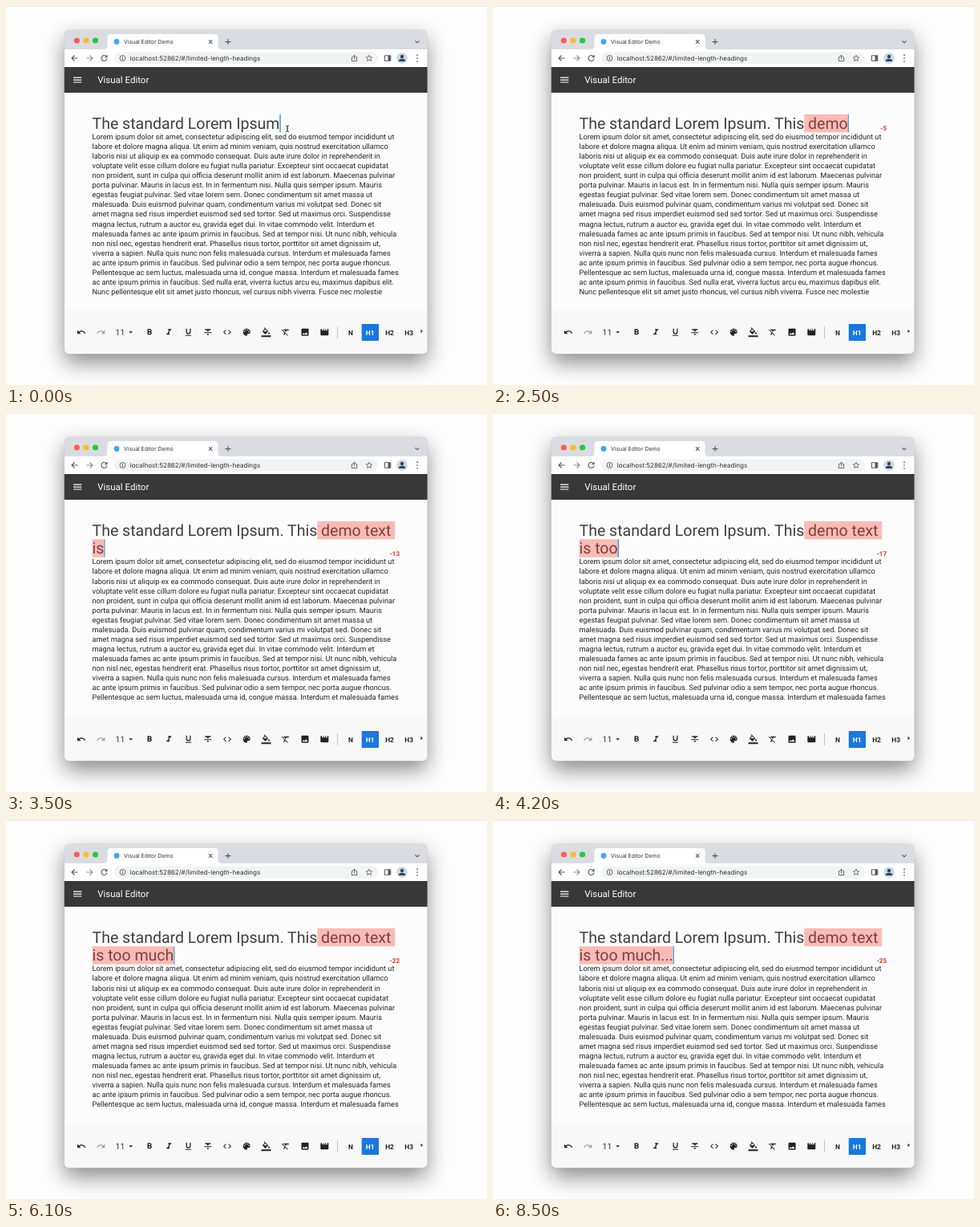
These frames come from a looping animation (600x472 px, 8.6 s). An HTML page:

```html
<!DOCTYPE html>
<html lang="en">
<head>
<meta charset="utf-8">
<title>Visual Editor Demo</title>
<style>
  html, body { margin: 0; width: 100%; height: 100%; overflow: hidden; background: #fdfdfd; }
  body { position: relative; }
  .shadow {
    position: absolute; left: 73px; top: 30px; width: 452px; height: 403px; border-radius: 6px;
    box-shadow: 0 0 1px rgba(0,0,0,.45), 0 11px 27px rgba(0,0,0,.46);
  }
  svg { position: absolute; left: 0; top: 0; display: block; }
  text { font-family: Roboto, sans-serif; white-space: pre; text-rendering: geometricPrecision; }
  .ui { font-family: Inter, sans-serif; fill: #303235; }
  .line { fill: none; stroke: #55585c; stroke-width: 1.1; }
  .heading { font-size: 19.53px; fill: #3f3f3f; }
  .body { font-size: 9.19px; fill: #222; }
  .count { font-size: 8px; font-weight: 700; fill: #d9362c; text-anchor: end; }
  .style { font-size: 8.4px; font-weight: 700; fill: #222; text-anchor: middle; }
  .over { fill: rgba(244,67,54,.35); }
</style>
</head>
<body>
<div class="shadow"></div>
<svg width="600" height="472" viewBox="0 0 600 472">
  <defs>
    <clipPath id="frame"><rect x="72.800" y="30" width="452.700" height="403.300" rx="6"/></clipPath>
    <clipPath id="page"><rect x="73" y="108" width="452" height="253.5"/></clipPath>
  </defs>
  <rect width="600" height="1" fill="#ebebeb"/>

  <g clip-path="url(#frame)">
    <rect x="72" y="30" width="454" height="25" fill="#dadce2"/>
    <rect x="72" y="54" width="454" height="22" fill="#fff"/>
    <rect x="72" y="76" width="454" height="32" fill="#383838"/>
    <rect x="72" y="108" width="454" height="270" fill="#fcfcfc"/>
    <rect x="72" y="378" width="454" height="56" fill="#f8f8f8"/>
  </g>

  <!-- browser tab strip -->
  <circle cx="88.3" cy="43" r="3.6" fill="#fe5f57"/>
  <circle cx="100" cy="43" r="3.6" fill="#febc2e"/>
  <circle cx="111.5" cy="43" r="3.6" fill="#28c840"/>
  <path d="M122 54q4.500 0 4.500-4.500V39.500q0-4.500 4.500-4.500H260q4.500 0 4.500 4.500V49.500q0 4.500 4.500 4.500z" fill="#fff"/>
  <circle cx="138" cy="44.500" r="3.400" fill="#42a5f5"/>
  <text class="ui" x="147" y="47.200" font-size="6.900">Visual Editor Demo</text>
  <path class="line" d="M253 42.400l4.400 4.400m0-4.400l-4.400 4.400M277 41.200v6.800m-3.400-3.400h6.800M510.500 43.300l2.500 2.500 2.500-2.500"/>

  <!-- address bar -->
  <rect x="135" y="57.500" width="329" height="15" rx="7.500" fill="#f1f3f4"/>
  <text class="ui" x="154.700" y="68" font-size="8.030">localhost:52862/#/limited-length-headings</text>
  <path class="line" d="M89.500 65h-7.500m3.500-3.500L82 65l3.500 3.500"/>
  <path class="line" style="stroke:#8d9094" d="M100.500 65h7.500m-3.500-3.500l3.500 3.500-3.500 3.500"/>
  <path class="line" d="M125.600 63.300a3.500 3.500 0 1 0 .4 2.200M126 61v2.800h-2.800"/>
  <g class="line">
    <circle cx="145.500" cy="65" r="3.500" stroke-width=".9"/>
    <path d="M145.500 64.500v2.500m0-4v.9"/>
    <path stroke-width=".9" d="M433 63.800h-1.700v4.800h6.400v-4.800H436M434.500 66.500v-5.300m-1.800 1.800l1.800-1.800 1.800 1.800"/>
    <path id="star" stroke-width=".8"/>
    <rect x="472.300" y="61.700" width="7.400" height="6.600" rx=".5"/>
  </g>
  <rect x="476.500" y="62" width="3" height="6" fill="#55585c"/>
  <circle cx="494" cy="65" r="6.800" fill="#c9d8e4"/>
  <path d="M489.800 69q0-3.200 4.200-3.200t4.200 3.200z" fill="#34465c"/>
  <circle cx="494" cy="63" r="2.200" fill="#34465c"/>
  <path d="M513 61.200v.01M513 65v.01M513 68.800v.01" stroke="#55585c" stroke-width="1.700" stroke-linecap="round"/>

  <!-- app bar -->
  <path d="M84 89.200h10.300M84 92.100h10.300M84 95h10.300" stroke="#fff" stroke-width="1.200"/>
  <text x="114.200" y="96.200" font-size="11.500" fill="#fff">Visual Editor</text>

  <!-- document -->
  <g clip-path="url(#page)">
    <text class="heading" id="line1" x="107.500" y="152.500"></text>
    <text class="heading" id="line2" x="107.500" y="174.900"></text>
    <g id="paragraph"></g>
    <rect class="over" id="over1" y="134.900" height="22.400"/>
    <rect class="over" id="over2" x="107.500" y="157.300" height="22.400"/>
    <text class="count" id="count" x="491"></text>
    <rect id="caret" width="1.200" height="22.400" fill="#1787d8"/>
  </g>
  <path id="mouse" d="M349 148.800q2 0 2 1.200v5.500q0 1.200-2 1.200M353 148.800q-2 0-2 1.200v5.500q0 1.200 2 1.200" fill="none" stroke="#222" stroke-width=".8"/>

  <!-- editor toolbar -->
  <g id="icons" fill="#222" fill-rule="evenodd"></g>
  <text x="136.600" y="410" font-size="10.300" fill="#333">11</text>
  <path d="M153.200 405.200h5l-2.500 2.600z" fill="#333"/>
  <path d="M413.500 399v15" stroke="#c4c4c4"/>
  <rect x="443.700" y="396" width="21.300" height="21" rx="1" fill="#1a78dc"/>
  <text class="style" x="430" y="409.500">N</text>
  <text class="style" x="454.200" y="409.500" style="fill:#fff">H1</text>
  <text class="style" x="478.500" y="409.500">H2</text>
  <text class="style" x="502.700" y="409.500">H3</text>
  <path d="M517.500 402.700l2.400 2.300-2.400 2.300z" fill="#222"/>
</svg>

<script>
const LOOP = 8600, LEFT = 107.5, MAX_WIDTH = 383.5, LINE = 12.06, HEADING_LINE = 22.4;
const BASE = 'The standard Lorem Ipsum';
const LIMIT = 'The standard Lorem Ipsum. This'.length;

// Typing bursts: start time, text, ms per key
const BURSTS = [
  [1000, '. This', 50], [2000, ' demo', 110], [2900, ' text', 90], [3350, ' is', 70],
  [3800, ' too', 110], [4400, ' much', 110], [6200, '...', 100]
];

const PARAGRAPH = `Lorem ipsum dolor sit amet, consectetur adipiscing elit, sed do eiusmod tempor incididunt ut
labore et dolore magna aliqua. Ut enim ad minim veniam, quis nostrud exercitation ullamco
laboris nisi ut aliquip ex ea commodo consequat. Duis aute irure dolor in reprehenderit in
voluptate velit esse cillum dolore eu fugiat nulla pariatur. Excepteur sint occaecat cupidatat
non proident, sunt in culpa qui officia deserunt mollit anim id est laborum. Maecenas pulvinar
porta pulvinar. Mauris in lacus est. In in fermentum nisi. Nulla quis semper ipsum. Mauris
egestas feugiat pulvinar. Sed vitae lorem sem. Donec condimentum sit amet massa ut
malesuada. Duis euismod pulvinar quam, condimentum varius mi volutpat sed. Donec sit
amet magna sed risus imperdiet euismod sed sed tortor. Sed ut maximus orci. Suspendisse
magna lectus, rutrum a auctor eu, gravida eget dui. In vitae commodo velit. Interdum et
malesuada fames ac ante ipsum primis in faucibus. Sed at tempor nisi. Ut nunc nibh, vehicula
non nisl nec, egestas hendrerit erat. Phasellus risus tortor, porttitor sit amet dignissim ut,
viverra a sapien. Nulla quis nunc non felis malesuada cursus. Interdum et malesuada fames
ac ante ipsum primis in faucibus. Sed pulvinar odio a sem tempor, nec porta augue rhoncus.
Pellentesque ac sem luctus, malesuada urna id, congue massa. Interdum et malesuada fames
ac ante ipsum primis in faucibus. Sed nulla erat, viverra luctus arcu eu, maximus dapibus elit.
Nunc pellentesque elit sit amet justo rhoncus, vel cursus nibh viverra. Fusce nec molestie`;

const hole = (x, y) => `M${x - 1.5} ${y}a1.5 1.5 0 1 0 3 0a1.5 1.5 0 1 0-3 0z`;

// Centre x and outline on a 24-unit grid
const ICONS = [
  [94, 'M12.5 8c-2.65 0-5.05 1-6.9 2.6L2 7v9h9l-3.6-3.6c1.4-1.2 3.1-1.9 5.1-1.9 3.5 0 6.5 2.3 7.6 5.5l2.4-.8C21 11 17 8 12.5 8z'],
  [118.3, 'M18.4 10.6C16.5 9 14.1 8 11.5 8c-4.6 0-8.6 3-10 7.2l2.4.8c1-3.2 4-5.5 7.6-5.5 2 0 3.7.7 5.1 1.9L13 16h9V7z', '#a2a2a2'],
  [179, 'M15.6 10.8c1-.7 1.65-1.8 1.65-2.8 0-2.3-1.75-4-4-4H7v14h7c2.1 0 3.75-1.7 3.75-3.8 0-1.5-.9-2.8-2.15-3.4zM10 6.5h3a1.5 1.5 0 0 1 0 3h-3zM13.5 15.5H10v-3h3.5a1.5 1.5 0 0 1 0 3z'],
  [203.2, 'M10 4v3h2.2l-3.4 8H6v3h8v-3h-2.2l3.4-8H18V4z'],
  [227.5, 'M12 17a6 6 0 0 0 6-6V3h-2.5v8a3.5 3.5 0 0 1-7 0V3H6v8a6 6 0 0 0 6 6zM5 19v2h14v-2z'],
  [251.8, 'M10 19h4v-3h-4zM5 4v3h5v3h4V7h5V4zM3 14h18v-2H3z'],
  [276, 'M9.4 16.6L4.8 12l4.6-4.6L8 6l-6 6 6 6zM14.6 16.6l4.6-4.6-4.6-4.6L16 6l6 6-6 6z'],
  [300.2, 'M12 3a9 9 0 1 0 0 18c1.4 0 2-1.4 1.1-2.5-.9-1 0-2.5 1.1-2.5H16a5 5 0 0 0 5-5c0-4.4-4-8-9-8z'
    + hole(6.5, 10.5) + hole(9.5, 6.5) + hole(14.5, 6.5) + hole(17.5, 10.5)],
  [324.5, 'M16.6 9L7.6 0 6.2 1.4l2.4 2.4L3.4 9a1.5 1.5 0 0 0 0 2l5.5 5.5a1.5 1.5 0 0 0 2.1 0l5.6-5.5a1.5 1.5 0 0 0 0-2zM5.2 10L10 5.2 14.8 10zM19 11.5s-2 2.2-2 3.5a2 2 0 0 0 4 0c0-1.3-2-3.5-2-3.5zM0 20h24v4H0z'],
  [348.7, 'M3.3 5L2 6.3l7 7L6.5 19h3l1.6-3.7 5.6 5.7 1.3-1.3zM6 5v.2L8.8 8h2.4l-.7 1.7 2.1 2.1L14.2 8H20V5z'],
  [373, 'M21 19V5a2 2 0 0 0-2-2H5a2 2 0 0 0-2 2v14a2 2 0 0 0 2 2h14a2 2 0 0 0 2-2zM8.5 13.5l2.5 3 3.5-4.5 4.5 6H5z'],
  [397.3, 'M18 4l2 4h-3l-2-4h-2l2 4h-3l-2-4H8l2 4H7L5 4H4a2 2 0 0 0-2 2v12a2 2 0 0 0 2 2h16a2 2 0 0 0 2-2V4z']
];

const $ = id => document.getElementById(id);
const set = (node, attrs) => {
  for (const name in attrs) node.setAttribute(name, attrs[name]);
  return node;
};
const add = (parent, tag, attrs) =>
  parent.appendChild(set(document.createElementNS('http://www.w3.org/2000/svg', tag), attrs));

PARAGRAPH.split('\n').forEach((line, i) => {
  add($('paragraph'), 'text', { class: 'body', x: LEFT, y: 166 + i * LINE }).textContent = line;
});

for (const [x, d, fill = '#222'] of ICONS)
  add($('icons'), 'path', { d, fill, transform: `translate(${x - 6} 400.2) scale(.5)` });

const starPoints = Array.from({ length: 10 }, (_, i) => {
  const radius = i % 2 ? 1.8 : 4, angle = (i / 5 - .5) * Math.PI;
  return `${453 + radius * Math.cos(angle)} ${65.2 + radius * Math.sin(angle)}`;
});
set($('star'), { d: `M${starPoints.join('L')}z` });

function typedAt(t) {
  return BURSTS.map(([start, text, step]) =>
    t < start ? '' : text.slice(0, Math.floor((t - start) / step) + 1)).join('');
}

function caretOpacity(t) {
  if (t < 470) return 1;
  const phase = (t + 50) % 1000;
  return phase < 500
    ? 1 - (1 - Math.min(1, phase / 270)) ** 2
    : Math.max(0, 1 - (phase - 500) / 270);
}

let shown = null;

function layout(title) {
  const line1 = $('line1'), line2 = $('line2');
  line1.textContent = title;
  let cut = title.length;
  while (line1.getSubStringLength(0, cut) > MAX_WIDTH) cut = title.lastIndexOf(' ', cut - 1);
  const wrapped = cut < title.length;
  const first = wrapped ? title.slice(0, cut + 1) : title;
  const second = title.slice(first.length);
  line1.textContent = first;
  line2.textContent = second;

  const end1 = LEFT + line1.getComputedTextLength();
  const width2 = wrapped ? line2.getComputedTextLength() : 0;
  const excess = Math.max(0, title.length - LIMIT);
  const start = excess ? LEFT + line1.getSubStringLength(0, LIMIT) : end1;
  const shift = wrapped ? HEADING_LINE : 0;

  set($('over1'), { x: start, width: end1 - start });
  set($('over2'), { width: width2 });
  set($('caret'), { x: wrapped ? LEFT + width2 : end1, y: 134.9 + shift });
  set($('paragraph'), { transform: `translate(0 ${shift})` });
  set($('count'), { y: 155.4 + shift }).textContent = excess ? `-${excess}` : '';
}

function render(now) {
  const t = now % LOOP;
  const title = BASE + typedAt(t);
  if (title !== shown) layout(shown = title);
  set($('caret'), { opacity: caretOpacity(t) });
  set($('mouse'), { opacity: t < 700 ? 1 : 0 });
}

let origin;
function tick(now) {
  origin ??= now;
  render(now - origin);
  requestAnimationFrame(tick);
}
render(0);
requestAnimationFrame(tick);
</script>
</body>
</html>
```
